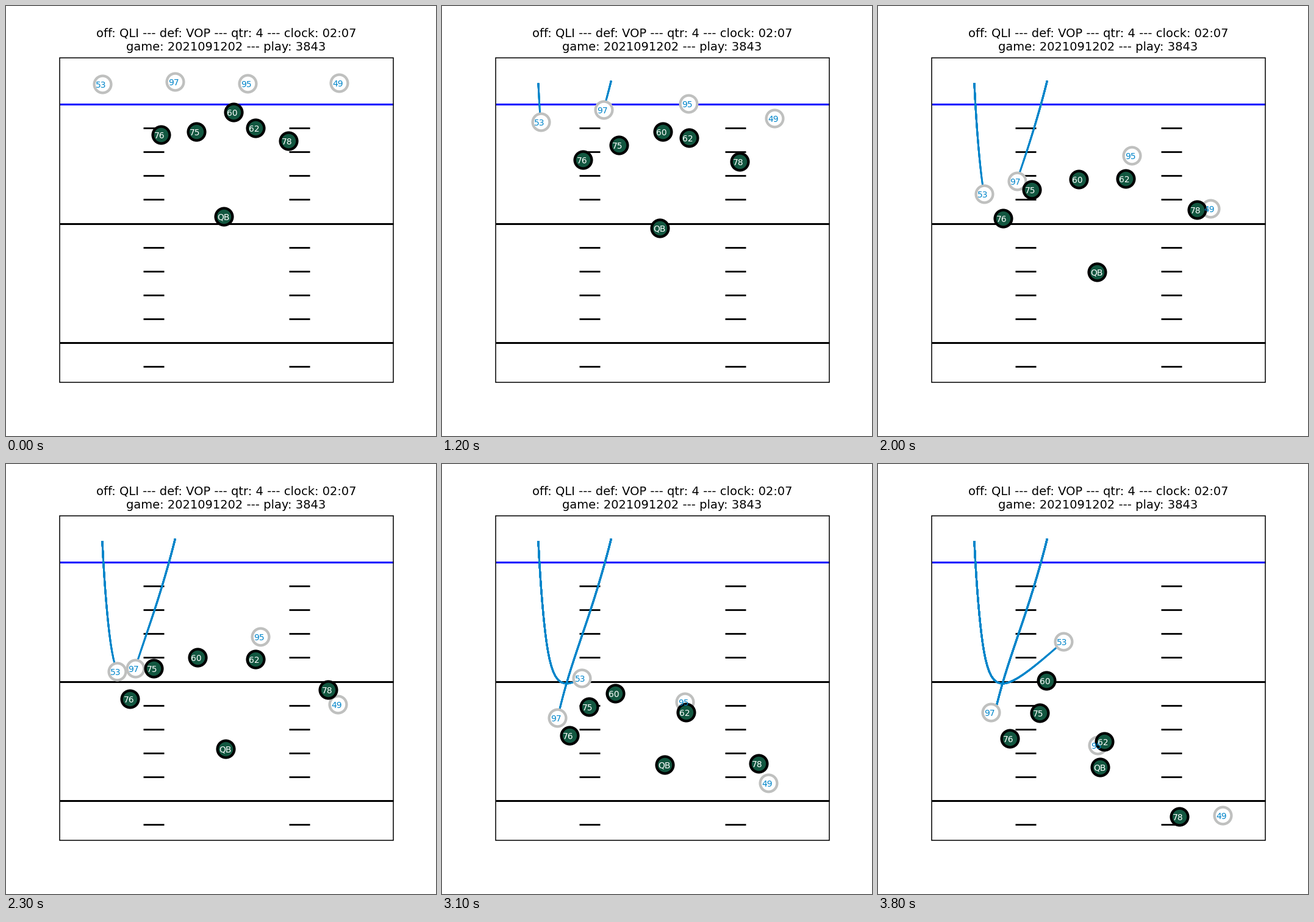
These frames come from a looping animation (705x705 px, 3.9 s). A matplotlib script:

```python
import numpy as np
import matplotlib.pyplot as plt
from matplotlib.animation import FuncAnimation
from matplotlib.patches import Rectangle

SIZE, DPI = 705, 100
FRAMES, INTERVAL = 39, 100
SNAP, CONTACT = 4.5, 17
LEFT, RIGHT, TOP, BOTTOM = 88, 635, 85, 617
BLUE, SILVER, GREEN = "#0085CA", "#BFC0BF", "#125740"

plt.rcParams["font.family"] = "DejaVu Sans"


def spline(t, p, at):
    """Smooth curve through points p that starts at rest and coasts at the end."""
    h = np.diff(t)
    step = np.diff(p, axis=0) / h[:, None]
    n = len(t)
    a = np.zeros((n, n))
    b = np.zeros_like(p)
    a[0, 0] = 1
    for i in range(1, n - 1):
        a[i, i - 1:i + 2] = 1 / h[i - 1], 2 / h[i - 1] + 2 / h[i], 1 / h[i]
        b[i] = 3 * (step[i - 1] / h[i - 1] + step[i] / h[i])
    a[-1, -2:] = 1, 2
    b[-1] = 3 * step[-1]
    m = np.linalg.solve(a, b)

    k = np.clip(np.searchsorted(t, at, side="right") - 1, 0, n - 2)
    h = h[k][:, None]
    u = ((at - t[k]) / h[:, 0])[:, None]
    return (p[k] * (1 + 2 * u) * (1 - u) ** 2 + p[k + 1] * u * u * (3 - 2 * u)
            + h * u * (1 - u) * (m[k] * (1 - u) - m[k + 1] * u))


def route(start, *spots):
    """Wait for the snap, then pass spots evenly timed from contact to the end."""
    t = np.array([SNAP, *np.linspace(CONTACT, FRAMES - 1, len(spots))])
    at = np.maximum(np.arange(FRAMES), SNAP)
    return spline(t, np.array([start, *spots], float), at)


defense = {
    "53": route((158, 128), (168, 265), (186, 348), (229, 351), (304, 291)),
    "97": route((277, 124), (244, 238), (207, 350), (189, 416), (185, 407)),
    "95": route((396, 127), (413, 209), (416, 297), (398, 390), (360, 461)),
    "49": route((546, 126), (545, 271), (543, 414), (535, 523), (565, 576)),
}
offense = {
    "76": route((254, 211), (211, 309), (206, 428), (216, 450)),
    "75": route((312, 206), (265, 268), (236, 379), (265, 408)),
    "60": route((373, 174), (343, 252), (309, 327), (284, 376), (276, 355)),
    "62": route((409, 200), (404, 251), (408, 374), (371, 455)),
    "78": route((463, 221), (513, 302), (529, 384), (519, 491), (494, 578)),
    "QB": route((357, 345), (358, 402), (361, 475), (365, 493), (364, 497)),
}

fig = plt.figure(figsize=(SIZE / DPI, SIZE / DPI), dpi=DPI, facecolor="white")
ax = fig.add_axes([0, 0, 1, 1])
ax.set_xlim(0, SIZE)
ax.set_ylim(SIZE, 0)
ax.axis("off")


def stripe(x0, x1, y, color="black", lw=2):
    ax.plot([x0, x1], [y, y], color=color, lw=lw, solid_capstyle="butt",
            zorder=1)


# Field: one stripe per yard, full width every five yards.
for yard in range(12):
    y = 161.05 + 39.1 * yard
    if yard % 5 == 0:
        stripe(LEFT, RIGHT, y, "black" if yard else "blue", 2.2)
    else:
        for x in (225, 464):
            stripe(x, x + 34, y)
ax.add_patch(Rectangle((LEFT, TOP), RIGHT - LEFT, BOTTOM - TOP, fill=False,
                       ec="black", lw=1.1, snap=True, zorder=2.5))

for y, line in ((51, "off: QLI --- def: VOP --- qtr: 4 --- clock: 02:07"),
                (73, "game: 2021091202 --- play: 3843")):
    ax.text(360.9, y, line, size=14, ha="center", va="baseline")

# Each frame lays the whole trail down again, so older parts grow heavier.
trails = [(end, ax.plot(*defense[name][:end + 1].T, color=BLUE, lw=2,
                        zorder=2)[0])
          for name in ("53", "97") for end in range(1, FRAMES)]


def team(routes, face, edge, ink, z):
    dots = ax.scatter([0] * len(routes), [0] * len(routes), s=400, lw=3.1,
                      facecolor=face, edgecolor=edge, zorder=z)
    labels = [ax.text(0, 0, name, size=10, color=ink, ha="left",
                      va="baseline", zorder=6) for name in routes]
    return routes, dots, labels


teams = [team(defense, "white", SILVER, BLUE, 3),
         team(offense, GREEN, "black", "white", 4)]


def draw(frame):
    for end, trail in trails:
        trail.set_visible(end <= frame)
    for routes, dots, labels in teams:
        spots = np.array([r[frame] for r in routes.values()])
        dots.set_offsets(spots)
        for label, (x, y) in zip(labels, spots):
            label.set_position((x - 11, y + 6))
    return []


anim = FuncAnimation(fig, draw, frames=FRAMES, interval=INTERVAL,
                     init_func=lambda: draw(0), repeat=True, repeat_delay=0)
plt.show()
```
